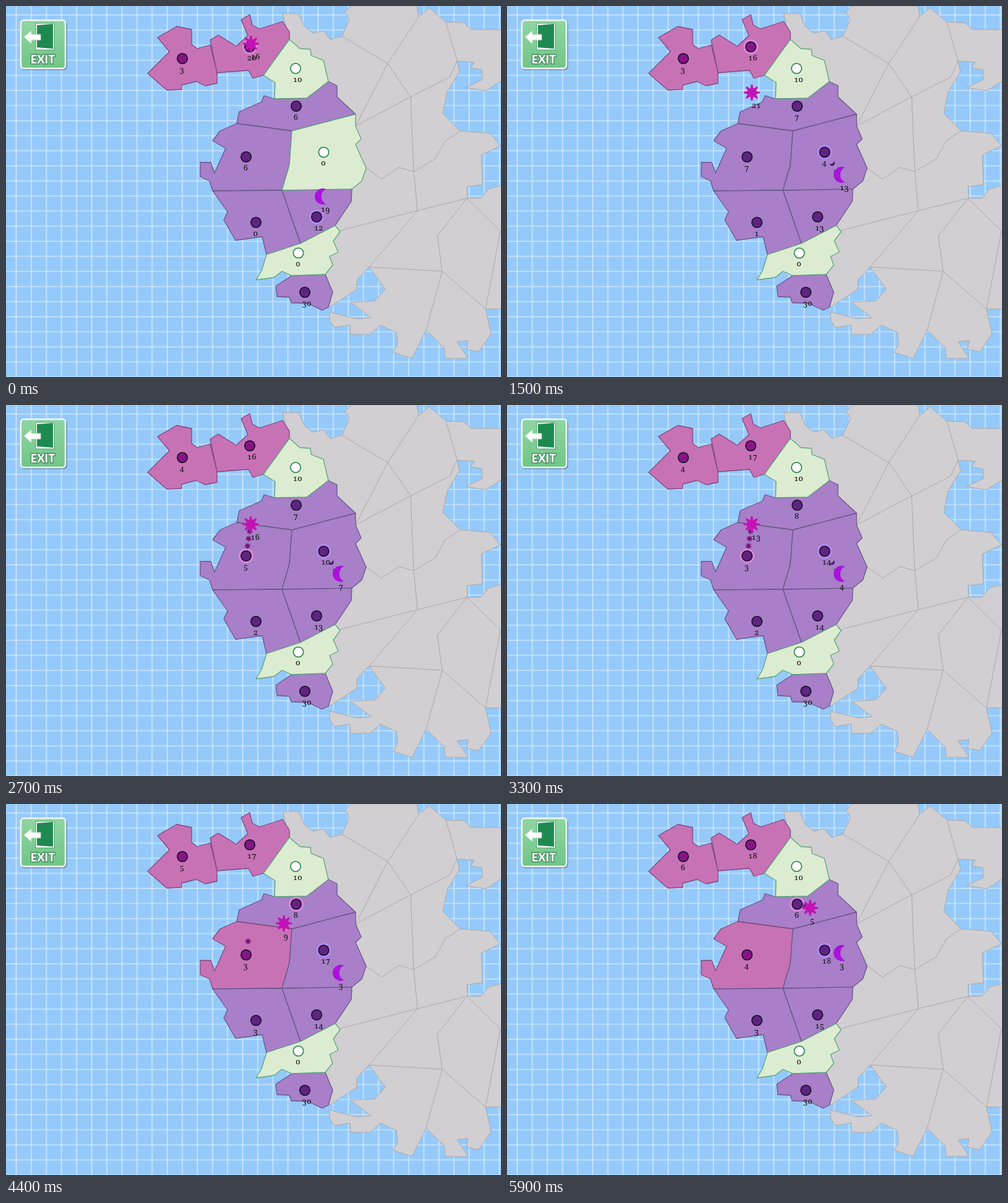
Recreate the animation shown at these times as an HTML page. Size 800x600 px, loop 6 s.

```html
<!DOCTYPE html>
<html lang="en">
<head>
<meta charset="utf-8">
<style>
html, body { margin: 0; width: 100%; height: 100%; overflow: hidden; background: #94c9fa; }
svg { display: block; width: 800px; height: 600px; }
.count { font: 13px "Noto Serif", serif; font-variant-numeric: oldstyle-nums; fill: #111; }
.exit { font: 900 18px Lato, sans-serif; fill: #fff; stroke: #3d8457; stroke-width: 2.5; paint-order: stroke; text-anchor: middle; }
.land { stroke-width: 1.3; stroke-linejoin: round; }
.sun { fill: #c872b6; stroke: #7d4a7c; }
.moon { fill: #a87fc8; stroke: #695788; }
.none { fill: #dcecd0; stroke: #5aa680; }
.dot { stroke: #1d1230; stroke-width: 1.8; }
.dot.sun { fill: #871485; }
.dot.moon { fill: #5f2480; }
.dot.none { fill: #fff; stroke: #37885c; }
</style>
</head>
<body>
<svg viewBox="0 0 800 600">
  <defs>
    <pattern id="grid" x="4.3" y="2.3" width="24.4" height="24.4" patternUnits="userSpaceOnUse">
      <path d="M12.2 0V24.4M0 12.2H24.4" stroke="#cfe8fd" stroke-width="1.6"/>
    </pattern>
    <linearGradient id="button" x2="0" y2="1">
      <stop stop-color="#8fd6a2"/><stop offset="1" stop-color="#70c587"/>
    </linearGradient>
  </defs>
  <rect width="800" height="600" fill="#94c9fa"/>
  <rect width="800" height="600" fill="url(#grid)"/>
  <g stroke="#aaa8aa" stroke-linejoin="round">
    <path fill="#d1cfd1" d="M447 12H473L482 33 496 44 513 40 524 54 543 49 555 22 548 10 558 0H664L667 17 684 3 711 26 740 27 752 38H801V121L775 137 743 132 770 119 769 103 751 100 757 91 729 89 733 106 713 139 706 174 734 202 782 206 799 226 768 241 770 289 745 292 746 311H767L780 296 801 290V490H775L784 530 764 559 744 555 747 541 729 543 747 570H710L708 553 679 524 656 570 626 560 633 547 631 528 605 516 588 531H557L556 516 530 520 523 508V495L567 506 590 504 557 479 596 477 613 458 587 422 567 443V458L523 487 500 434 510 380 540 300 545 200 500 135 458 54Z"/>
    <path fill="none" d="M543 49L617 93 667 17M565 194L617 93 654 147 565 194M654 147L717 115 729 89 711 26M654 147L659 268 665 331 745 311 799 364 775 490 705 429 587 422 665 331 540 363M582 262L607 280 635 261 659 268 694 247 710 218 734 202M745 311L697 372 705 429 679 524"/>
  </g>
  <g id="lands">
    <polygon id="A" points="245 51 276 33 300 38 300 62 309 69 330 63 341 107 341 125 322 129 307 122 284 128 284 135 260 136 229 109 264 74"/>
    <polygon id="B" points="330 55 343 47 372 65 391 48 380 22 394 14 398 31 410 37 447 25 458 42 458 54 416 112 399 117 392 104 341 108"/>
    <polygon id="D" points="521 122 535 129 535 147 565 175 462 202 373 190 377 171 413 155 417 145 434 150 486 149"/>
    <polygon id="E" points="373 190 462 202 458 257 446 298 334 299 329 283 314 276 314 253 331 253 337 270 355 230 334 218 346 202"/>
    <polygon id="G" points="334 299 446 298 476 384 421 402 414 373 371 379 352 346 358 333"/>
    <polygon id="H" points="446 298 559 296 558 316 532 355 476 384"/>
    <polygon id="J" points="462 436 516 434 528 463 521 487 511 492 488 481 461 480 458 471 438 470 436 453"/>
    <polygon id="C" points="458 54 475 69 492 70 493 80 513 88 521 122 486 149 434 150 435 124 416 112"/>
    <polygon id="F" points="462 202 565 175 565 194 574 215 565 224 582 262 575 283 559 296 446 298 458 257"/>
    <polygon id="I" points="476 384 532 355 540 365 529 380 537 398 523 405 528 419 516 434 462 436 446 429 433 439 404 443 413 428 421 402"/>
  </g>
  <g id="pieces"></g>
  <rect x="24" y="24" width="75" height="80" rx="6" fill="#000" opacity=".25"/>
  <rect x="24" y="23" width="72" height="78" rx="5" fill="url(#button)" stroke="#f1f6f1" stroke-width="2.5"/>
  <path d="M48 28H78V71H48Z" fill="#fff" stroke="#4d9a68"/>
  <path d="M50 31L76 29V69L50 67Z" fill="#1f8a50"/>
  <path d="M29 50L41 40V46H56V55H41V61Z" fill="#fff" stroke="#b9d8c2"/>
  <text class="exit" x="59.5" y="93">EXIT</text>
</svg>
<script>
const LOOP = 6, STEP = 0.1, GROWTH = 2, FIRE_GAP = 0.2;
const UNIT_SPEED = 255, BULLET_SPEED = 60, HIT_RADIUS = 12;

const region = (id, x, y, owner, count, grows = LOOP) => ({ id, x, y, owner, count, grows });
const regions = [
  region("A", 285, 85, "sun", 3, 1.8),
  region("B", 394, 66, "sun", 20, 1.2),
  region("D", 469, 162, "moon", 6, 1.2),
  region("E", 388, 244, "moon", 6, 1.2),
  region("G", 404, 350, "moon", 0, 0.2),
  region("H", 502, 341, "moon", 12, 1.2),
  region("J", 483, 463, "moon", 30),
  region("C", 468, 101, "none", 10),
  region("F", 513.5, 236.5, "none", 0),
  region("I", 472.5, 399.5, "none", 0)
];

// Moves give a departure time and a destination; units fire at the nearest region.
const units = [
  { owner: "moon", color: "#ab12dc", halo: "#b48af2", shot: "#47166e", shotSize: 4.2, count: 19, x: 509, y: 308,
    moves: [[0, 538, 273], [5.2, 538, 241]],
    volleys: [{ start: 0.34, shots: 16 }] },
  { owner: "sun", color: "#c413b4", halo: "#dc86dc", shot: "#761579", shotSize: 5, count: 16, x: 396, y: 61,
    moves: [[1.19, 395.5, 193], [4.15, 449, 193], [4.45, 490, 168]],
    loads: [{ start: 0.15, shots: 5 }],
    volleys: [{ start: 1.71, shots: 12 }, { start: 5.15, shots: 4 }] }
];

const distance = (a, b) => Math.hypot(a.x - b.x, a.y - b.y);
const nearest = p => regions.reduce((a, b) => distance(p, b) < distance(p, a) ? b : a);

function position(unit, t) {
  let p = { x: unit.x, y: unit.y };
  for (const [start, x, y] of unit.moves) {
    if (t < start) break;
    const k = Math.min(1, (t - start) * UNIT_SPEED / distance(p, { x, y }));
    p = { x: p.x + (x - p.x) * k, y: p.y + (y - p.y) * k };
  }
  return p;
}

function schedule(unit, volleys = []) {
  return volleys.flatMap(({ start, shots }) => {
    const from = position(unit, start), target = nearest(from);
    const flight = (distance(from, target) - HIT_RADIUS) / BULLET_SPEED;
    const angle = Math.atan2(target.y - from.y, target.x - from.x);
    return Array.from({ length: shots }, (_, i) => ({ time: start + i * FIRE_GAP, from, target, flight, angle }));
  });
}

for (const u of units) {
  u.shots = schedule(u, u.volleys);
  u.pickups = schedule(u, u.loads);
}
const events = units.flatMap(u => [
  ...u.shots.map(s => ({ time: s.time + s.flight, target: s.target, kind: u.owner })),
  ...u.pickups.map(s => ({ time: s.time, target: s.target, kind: "load" }))
]).sort((a, b) => a.time - b.time);

function stateAt(region, t) {
  let { owner, count, grows } = region;
  const growTo = time => {
    for (; grows <= time; grows += GROWTH) if (owner !== "none") count++;
  };
  for (const { time, target, kind } of events) {
    if (time > t) break;
    if (target !== region) continue;
    growTo(time);
    if (kind === "load") count--;
    else if (owner === kind) count++;
    else if (owner === "none") {
      owner = kind;
      count = 1;
      grows = time + GROWTH;
    } else if (--count === 0) owner = "none";
  }
  growTo(t);
  return { owner, count };
}

const starPath = r => "M" + Array.from({ length: 32 }, (_, i) => {
  const k = i % 4 < 2 ? r : r * 0.6, a = (i - 0.5) * Math.PI / 16;
  return (k * Math.cos(a)).toFixed(2) + " " + (k * Math.sin(a)).toFixed(2);
}).join("L") + "Z";
const moonPath = r => `M${r * 0.62} ${-r * 0.92}A${r} ${r} 0 1 0 ${r * 0.62} ${r * 0.92}A${r * 1.03} ${r * 1.03} 0 0 1 ${r * 0.62} ${-r * 0.92}Z`;
const shapes = { sun: starPath, moon: moonPath };
const icon = (owner, r, x, y, color, turn = 0) =>
  `<path transform="translate(${x} ${y}) rotate(${turn})" fill="${color}" d="${shapes[owner](r)}"/>`;
const circle = (p, r, attributes) => `<circle cx="${p.x}" cy="${p.y}" r="${r}" ${attributes}/>`;
const label = (x, y, n) => `<text class="count" x="${x}" y="${y}">${n}</text>`;

const pieces = document.getElementById("pieces");

function render(t) {
  let halos = "", dots = "", bullets = "", icons = "";
  for (const r of regions) {
    const { owner, count } = stateAt(r, t);
    document.getElementById(r.id).setAttribute("class", `land ${owner}`);
    dots += circle(r, 8.2, `class="dot ${owner}"`) + label(r.x - 4.5, r.y + 21.5, count);
  }
  for (const u of units) {
    const p = position(u, t);
    const fired = u.shots.filter(s => s.time <= t);
    const count = u.count + u.pickups.filter(s => s.time <= t).length - fired.length;
    halos += circle(nearest(p), 12, `fill="${u.halo}"`);
    for (const { time, from, flight, angle } of fired) {
      const age = t - time, d = age * BULLET_SPEED;
      if (age < flight)
        bullets += icon(u.owner, u.shotSize, from.x + d * Math.cos(angle), from.y + d * Math.sin(angle), u.shot, angle * 180 / Math.PI);
    }
    icons += icon(u.owner, 13, p.x, p.y, u.color) + label(p.x - 0.5, p.y + 25, count);
  }
  pieces.innerHTML = halos + dots + bullets + icons;
}

const begin = performance.now();
function tick() {
  const t = (performance.now() - begin) / 1000 % LOOP;
  render(Math.floor(t / STEP) * STEP + 1e-6);
  requestAnimationFrame(tick);
}
tick();
</script>
</body>
</html>
```
